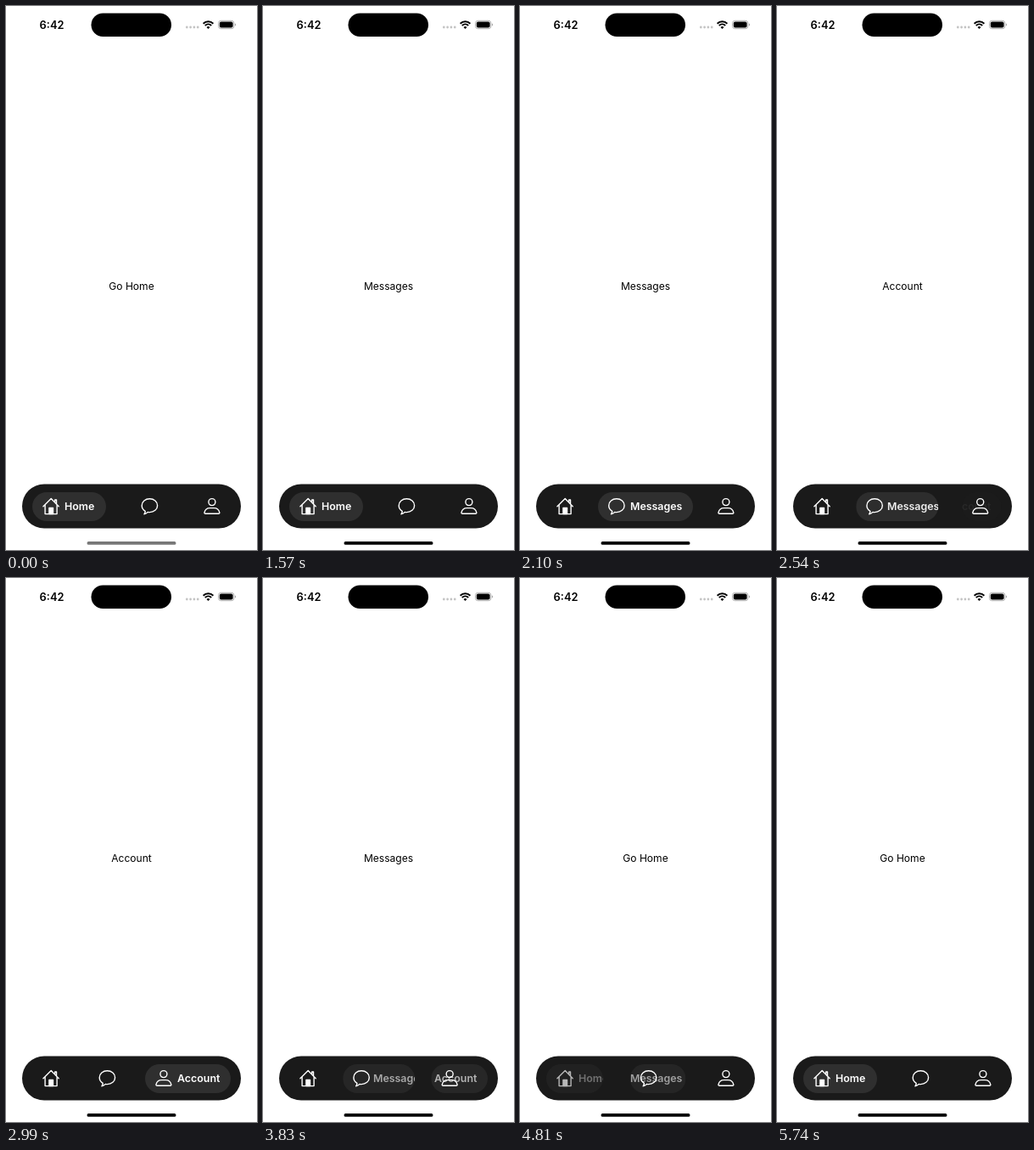
Animation of 296 by 640 pixels, one loop 6 s. Source, as an HTML page:

```html
<!DOCTYPE html>
<html lang="en">
<head>
<meta charset="utf-8">
<title>Tab bar</title>
<style>
  html, body { margin: 0; height: 100%; overflow: hidden; background: #fff; }
  body > svg { display: block; width: 100vw; height: 100vh; }
  text { font: 12.05px Inter, sans-serif; }
  .clock { font-size: 12.8px; font-weight: 600; }
  .label { font-size: 12.4px; font-weight: 600; fill: #fff; }
  .icon { fill: none; stroke: #fff; stroke-width: 1.4; stroke-linecap: round; stroke-linejoin: round; }
</style>
</head>
<body>
<svg id="stage" viewBox="0 0 296 640">
  <text class="clock" x="54" y="26.6" text-anchor="middle">6:42</text>
  <rect x="100.5" y="8.5" width="94.5" height="27.5" rx="13.75"/>
  <g fill="#c4c4c4">
    <circle cx="213.3" cy="25" r="1.4"/><circle cx="217.6" cy="25" r="1.4"/>
    <circle cx="221.9" cy="25" r="1.4"/><circle cx="226.2" cy="25" r="1.4"/>
  </g>
  <g fill="none" stroke="#000" stroke-width="1.9">
    <path d="M232.6 20.7a8.4 8.4 0 0 1 11.8 0M234.8 23a5.3 5.3 0 0 1 7.4 0"/>
  </g>
  <path d="M238.5 27l-2-2.1a2.9 2.9 0 0 1 4 0z"/>
  <rect x="250.5" y="17.3" width="18.4" height="9.4" rx="3" fill="none" stroke="#a8a8a8" stroke-width=".9"/>
  <rect x="251.8" y="18.6" width="15.8" height="6.8" rx="1.9"/>
  <path d="M270 20.4a1.7 1.7 0 0 1 0 3.2z" fill="#a8a8a8"/>

  <text id="title" x="148" y="334" text-anchor="middle"></text>
  <rect x="19" y="562.5" width="258" height="52" rx="26" fill="#1a1a1a"/>
  <g id="tabs"></g>
  <rect id="indicator" x="95.5" y="630" width="105" height="3.8" rx="1.9"/>
</svg>
<script>
const LOOP = 6000, DURATION = 300, LEFT = 31, RIGHT = 265, CLOSED = 44;

// Icons are centred on 0,0.
const tabs = [
  { title: 'Go Home', label: 'Home', open: 87, icon:
    '<path d="M-9 .2L.3-9 9.3.2M-6.8-1.6V9H7.2V-1.6M4.8-4.8V-7.6H6.6V-2.8"/>' +
    '<path d="M-2 9V1.8H2.6V9z" fill="#fff"/>' },
  { title: 'Messages', label: 'Messages', open: 112, icon:
    '<path d="M-5.2 5.7C-8 4-9.2 1.7-9.2-.9C-9.2-5.4-5.1-8.8 0-8.8S9.2-5.4 9.2-.9S5.1 7 0 7' +
    'C-.8 7-1.5 6.9-2.2 6.8C-3.4 8.2-4.8 9-6.4 9.2C-5.5 8.2-5.1 7-5.2 5.7z"/>' },
  { title: 'Account', label: 'Account', open: 101, icon:
    '<circle cy="-5" r="4"/>' +
    '<path d="M-7.7 8.7H7.7C8.6 8.7 9.1 8.1 8.9 7.2C8.1 3.8 5.3 2 2.5 2H-2.5C-5.3 2-8.1 3.8-8.9 7.2C-9.1 8.1-8.6 8.7-7.7 8.7z"/>' }
];

// at: tap, go: layout starts, lag: extra delay of the opening tab.
const taps = [
  { at: 1570, go: 1610, from: 0, to: 1, lag: 0 },
  { at: 2430, go: 2446, from: 1, to: 2, lag: 50 },
  { at: 3610, go: 3660, from: 2, to: 1, lag: 0 },
  { at: 4590, go: 4630, from: 1, to: 0, lag: 25, pressed: true }
];

// The screen refreshes in six even steps per burst.
const bursts = [[1570, 2100], [2210, 2770], [2890, 3400], [3610, 4150], [4270, 4810], [4930, 5520]];
const TOLERANCE = 8;

const $ = id => document.getElementById(id);
const clamp = v => Math.min(1, Math.max(0, v));
const mix = (a, b, p) => a + (b - a) * p;
const ease = ms => {
  const p = clamp(ms / DURATION);
  return p < .5 ? 2 * p * p : 1 - 2 * (1 - p) ** 2;
};

function layout(active) {
  const widths = tabs.map((tab, i) => i === active ? tab.open : CLOSED);
  const gap = (RIGHT - LEFT - widths[0] - widths[1] - widths[2]) / 2;
  let x = LEFT;
  return widths.map(w => {
    const box = { x, w };
    x += w + gap;
    return box;
  });
}
const layouts = tabs.map((_, i) => layout(i));

$('tabs').innerHTML = tabs.map(tab => `
  <svg y="572" height="34">
    <rect width="100%" height="34" rx="17" fill="#2f2f2f"/>
    <text class="label" y="21.2">${tab.label}</text>
    <g class="icon">${tab.icon}</g>
  </svg>`).join('');
const views = [...$('tabs').children].map(root => {
  const [chip, label, icon] = root.children;
  return { root, chip, label, icon };
});

function snap(t) {
  const now = t + TOLERANCE;
  const burst = bursts.findLast(b => b[0] <= now);
  if (!burst) return 0;
  const step = (burst[1] - burst[0]) / 5;
  return burst[0] + step * Math.min(5, Math.floor((now - burst[0]) / step));
}

function draw(time) {
  const t = snap(time);
  const tap = taps.findLast(k => k.at <= t) || { go: -LOOP, from: 0, to: 0, lag: 0 };
  $('title').textContent = tabs[tap.to].title;
  $('indicator').setAttribute('fill', t ? '#000' : '#777');

  views.forEach(({ root, chip, label, icon }, i) => {
    const opening = i === tap.to;
    const p = ease(t - tap.go - (opening ? tap.lag : 0));
    const a = layouts[tap.from][i], b = layouts[tap.to][i];
    const x = mix(a.x, b.x, p);
    const shown = opening ? p : i === tap.from ? 1 - ease(t - tap.go - 40) : 0;
    root.setAttribute('x', x);
    root.setAttribute('width', mix(a.w, b.w, p));
    root.setAttribute('opacity', opening && tap.pressed ? clamp(.3 + .7 * (t - tap.at) / 400) : 1);
    chip.setAttribute('opacity', shown);
    label.setAttribute('opacity', shown);
    label.setAttribute('x', layouts[i][i].x + 38 - x);
    icon.setAttribute('transform', `translate(${21.9} 16.6)`);
  });
}

const start = performance.now();
(function tick() {
  draw((performance.now() - start) % LOOP);
  requestAnimationFrame(tick);
})();
</script>
</body>
</html>
```
